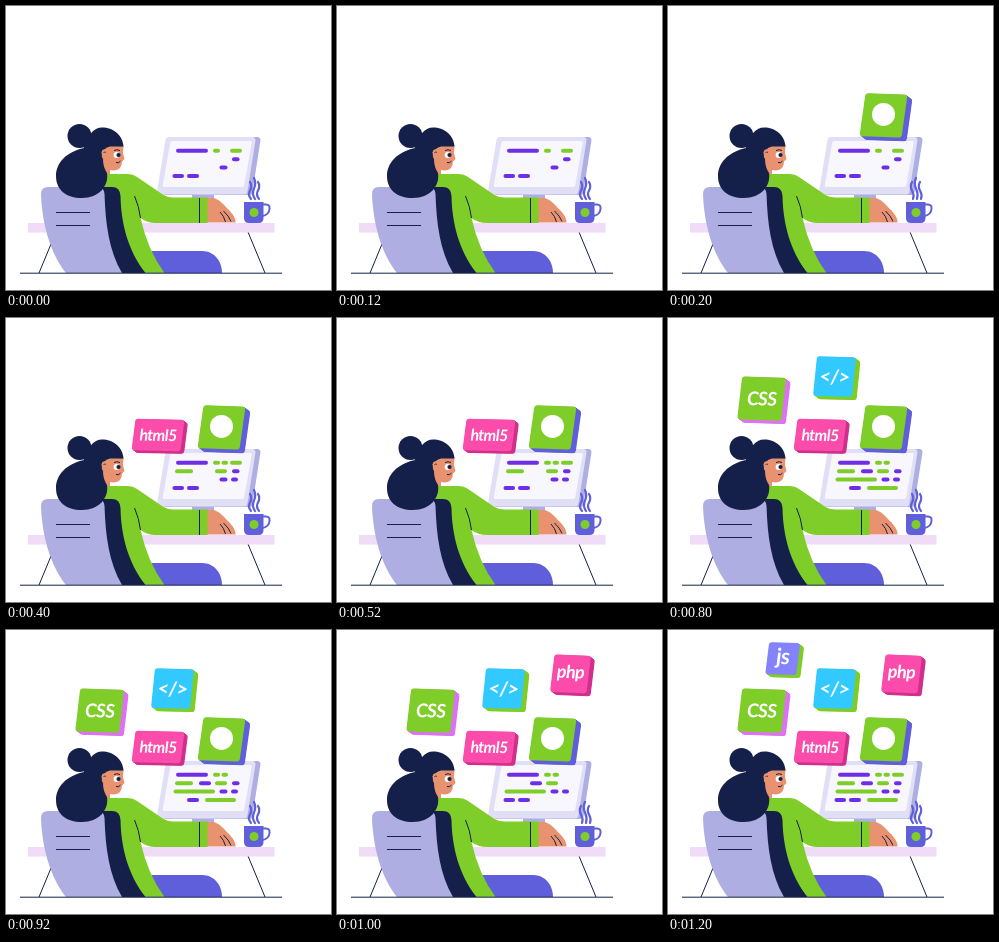
These frames come from a looping animation (325 by 284 pixels, 1400 ms). An HTML page with a canvas:

```html
<!DOCTYPE html>
<html lang="en">
<head>
<meta charset="utf-8">
<title>Coding at a desk</title>
<style>
html, body { margin: 0; width: 100%; height: 100%; overflow: hidden; background: #fff; }
canvas { display: block; width: 325px; height: 284px; }
</style>
</head>
<body>
<canvas id="stage"></canvas>
<script>
const W = 325, H = 284, STEP = 200, LOOP = 1400;
const NAVY = '#14204a', GREEN = '#7fcd28', BLUE = '#605fdb', LILAC = '#aeaee2',
      PALE = '#e1dff5', PINK = '#fc4cab', ROSE = '#d0308c', SKIN = '#e8926f',
      VIOLET = '#6d2ee5', ORCHID = '#dd72f3';
const canvas = document.getElementById('stage');
const dpr = window.devicePixelRatio || 1;
canvas.width = W * dpr;
canvas.height = H * dpr;
const ctx = canvas.getContext('2d');

function fill(d, color) {
  ctx.fillStyle = color;
  ctx.fill(new Path2D(d));
}

function line(d, color = NAVY, width = 1) {
  ctx.strokeStyle = color;
  ctx.lineWidth = width;
  ctx.stroke(new Path2D(d));
}

function dot(x, y, r, color) {
  ctx.fillStyle = color;
  ctx.beginPath();
  ctx.arc(x, y, r, 0, Math.PI * 2);
  ctx.fill();
}

// Rounded quadrilateral through four corners
function quad(p, r, color) {
  ctx.fillStyle = color;
  ctx.beginPath();
  ctx.moveTo((p[0][0] + p[3][0]) / 2, (p[0][1] + p[3][1]) / 2);
  p.forEach((a, i) => ctx.arcTo(...a, ...p[(i + 1) % 4], r));
  ctx.closePath();
  ctx.fill();
}

// Leaning tile: front face, extruded side and a label
function tile({ x, y, w, h, lean, drop, depth, face, side, text, size }) {
  const shape = (dx, dy) => [
    [x + lean + dx, y + dy], [x + lean + w + dx, y + drop + dy],
    [x + w + dx, y + drop + h + dy], [x + dx, y + h + dy]
  ];
  for (let i = depth; i > 0; i -= 0.5) quad(shape(i, i * 0.75), 3, side);
  quad(shape(0, 0), 3, face);
  const cx = x + (w + lean) / 2, cy = y + (h + drop) / 2;
  if (!text) return dot(cx, cy - 1, 11.5, '#fff');
  ctx.save();
  ctx.translate(cx, cy);
  ctx.transform(1, drop / w, 0, 1, 0, 0);
  ctx.font = `italic 700 ${size}px Lato, "Open Sans", sans-serif`;
  ctx.letterSpacing = '-0.6px';
  ctx.textAlign = 'center';
  ctx.fillStyle = '#fff';
  ctx.fillText(text, 0, size * (/^p|j/.test(text) ? 0.24 : 0.36));
  ctx.restore();
}

const tiles = [
  { from: 1, x: 191.5, y: 87.2, w: 42, h: 43, lean: 6, drop: 1.5, depth: 5, face: GREEN, side: BLUE },
  { from: 2, x: 125.5, y: 100.8, w: 49, h: 31.5, lean: 4, drop: 1, depth: 3.5, face: PINK, side: ROSE, text: 'html5', size: 16 },
  { from: 3, x: 145, y: 38.3, w: 39, h: 39.5, lean: 4, drop: 1, depth: 4.5, face: '#31c9ff', side: GREEN, text: '</>', size: 20 },
  { from: 4, x: 69.2, y: 58.3, w: 44, h: 43, lean: 5, drop: 1.5, depth: 4.5, face: GREEN, side: ORCHID, text: 'CSS', size: 19 },
  { from: 5, x: 213, y: 24.3, w: 36.5, h: 37.5, lean: 4.5, drop: 1.5, depth: 4, face: PINK, side: ROSE, text: 'php', size: 18 },
  { from: 6, x: 97.2, y: 12.2, w: 31, h: 32, lean: 4, drop: 1, depth: 4, face: '#8482fd', side: GREEN, text: 'js', size: 22 }
];

// Code strokes: left, right, row, colour, visible in these steps
const always = () => true;
const second = s => s > 1;
const late = s => s > 2;
const full = s => s > 0 && s % 2 === 0;
const code = [
  [172, 200, 0, VIOLET, always], [209, 212, 0, GREEN, always],
  [217.5, 220, 0, GREEN, second], [226, 234, 0, GREEN, s => s < 3 || s === 6],
  [171, 185, 1, GREEN, full], [195, 203, 1, VIOLET, late],
  [211, 219, 1, GREEN, second], [228, 231.5, 1, VIOLET, s => s < 2 || full(s)],
  [169.5, 207, 2, GREEN, late], [215.5, 219.5, 2, VIOLET, always],
  [227, 230, 2, VIOLET, second], [168.5, 176, 3, VIOLET, s => s !== 4],
  [183, 191, 3, VIOLET, always], [201, 228, 3, GREEN, s => s > 3 && full(s)]
];

function monitor(step) {
  fill('M186 187H208V194H186Z', LILAC);
  quad([[164, 131], [255, 131], [246, 189], [156, 189]], 3, LILAC);
  quad([[160, 131], [250, 131], [241, 188.5], [150.5, 188.5]], 3, PALE);
  quad([[164.5, 135], [246, 135], [238, 181], [156.5, 181]], 2, '#f8f7fe');
  ctx.lineCap = 'round';
  for (const [a, b, row, color, shown] of code) {
    const y = 144.8 + row * 8.4;
    if (shown(step)) line(`M${a} ${y}H${b}`, color, 4);
  }
  ctx.lineCap = 'butt';
}

function desk() {
  line('M50 226L33 267M242 226L259 267');
  fill('M22 217H268.5V226.5H22Z', '#f0dcf6');
}

function mug(step) {
  line('M256 198.5H260Q264 198.5 263.5 203Q263 209 256 210', BLUE, 2);
  fill('M238 196H257.5V212Q257.5 217 252.5 217H243Q238 217 238 212Z', BLUE);
  dot(248, 206.5, 4.5, GREEN);
  const sway = step % 2 ? -2.5 : 2.5;
  ctx.lineCap = 'round';
  for (let i = 0; i < 3; i++) {
    const x = 244 + i * 4, y = i === 1 ? 172 : 176, m = (y + 193) / 2;
    line(`M${x} ${y}Q${x + sway} ${(y + m) / 2} ${x} ${m}T${x + 1} 193`, BLUE, 2.2);
  }
  ctx.lineCap = 'butt';
}

function body() {
  fill('M135 245H196C209 245 216 256 216 267H135Z', BLUE);
  fill('M201 192H207C213 193 217 198 222 203C227 208 230 213 229.5 216.5H201Z', SKIN);
  line('M214 206Q218 210 219.5 216M217.5 205Q223 210 225 215.5');
  fill('M98 168H122Q127 168 131 171L156 188Q161 191.5 168 191.5H201.5V217H150Q141 217 134.5 212Q142 245 158.5 267H125L98 190Z', GREEN);
  line('M193.5 192V217M128.5 190Q133 200 134.5 212');
}

function chair() {
  fill('M86 181H106Q114 181 114.5 190C115 217 122 245 139.5 267H100Z', NAVY);
  fill('M42 181H92Q98 181 98.5 188C99.5 218 103 245 116 267H60C44 247 36 217 35 188Q35 181 42 181Z', LILAC);
  line('M50 206.5H84M50 219.5H84');
}

function head() {
  fill('M95 139H117.5L117 147L118.5 153L116 155.5Q116 164 108 164.5L104 164V168H94Z', SKIN);
  dot(73.5, 130, 12, NAVY);
  fill('M78 139C83 128 88 121.5 96 121.5C107 121.5 117 129 117.5 140.5H104Q100 141 98 144Q94 148 97 153Q97 161 101 167C103 180 93 192 76 192C60 192 50 184 50 170C50 157 60 146 78 142Z', NAVY);
  fill('M101 143.5Q96 142 95.5 146.5Q96 152 101 151Z', SKIN);
  line('M97.5 147Q98.5 145 100 146.5', NAVY, 0.8);
  dot(110.5, 149, 2.9, '#fff');
  dot(112.5, 149, 2.1, NAVY);
  line('M108 144.5Q111 143 114 144.5M110 156.5Q113 157.5 114.5 155');
}

function draw(now) {
  const step = Math.floor((now % LOOP) / STEP);
  ctx.setTransform(dpr, 0, 0, dpr, 0, 0);
  ctx.fillStyle = '#fff';
  ctx.fillRect(0, 0, W, H);
  monitor(step);
  desk();
  mug(step);
  body();
  chair();
  head();
  line('M14 267.2H276');
  tiles.filter(t => step >= t.from).forEach(tile);
}

let start;
function tick(now) {
  start ??= now;
  draw(now - start);
  requestAnimationFrame(tick);
}
requestAnimationFrame(tick);
</script>
</body>
</html>
```
